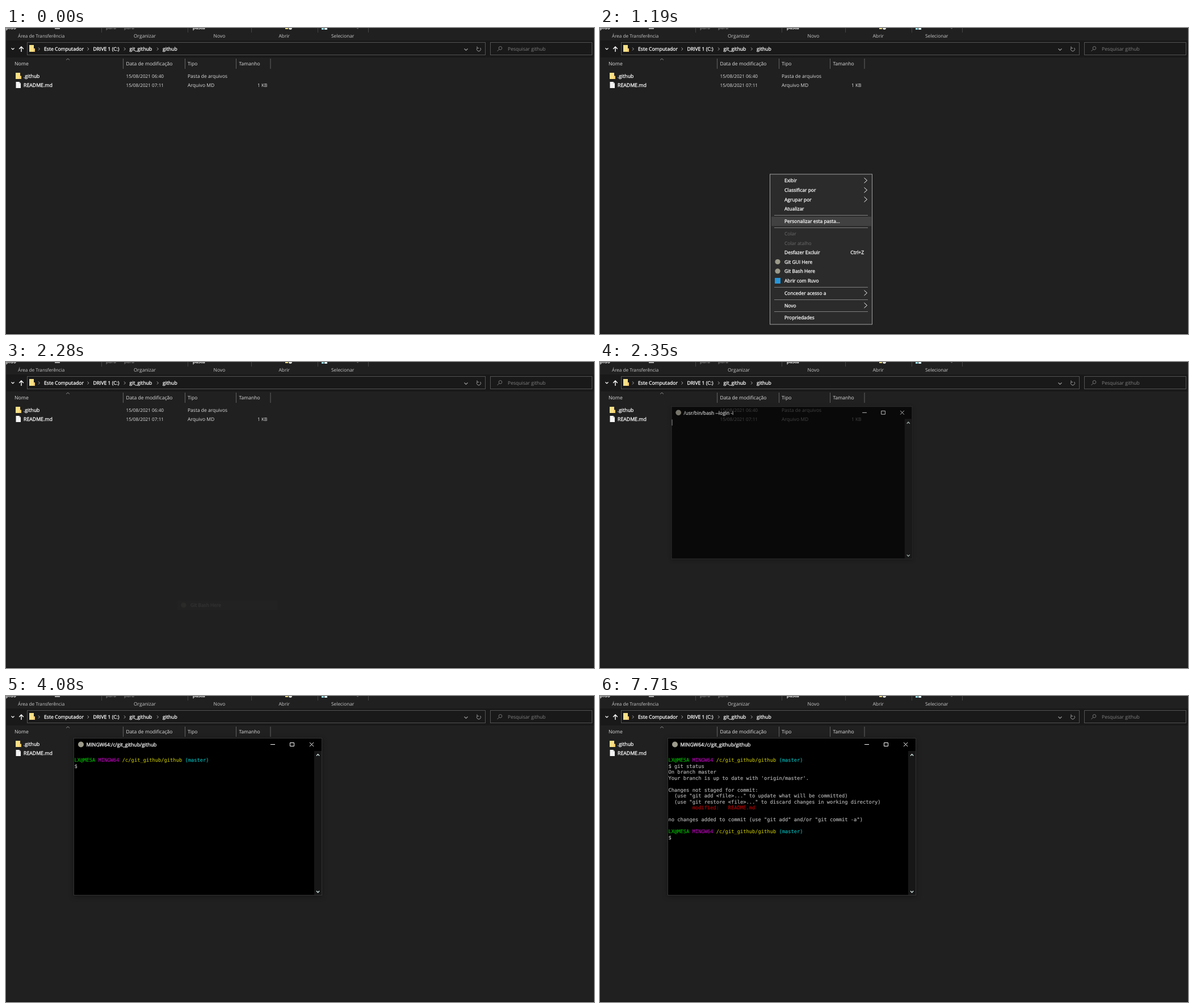
Recreate the animation shown at these times as an HTML page. Size 1036x540 px, loop 8000 ms.

```html
<!DOCTYPE html>
<html lang="pt-BR">
<head>
<meta charset="utf-8">
<title>Git status</title>
<style>
html, body { margin: 0; width: 100%; height: 100%; overflow: hidden; background: #202020; }
svg { display: block; width: 1036px; height: 540px; }
text { font: 8.55px "Open Sans", "Noto Sans", sans-serif; stroke-width: 0; white-space: pre; text-rendering: geometricPrecision; }
.strong { stroke-width: .28px; }
.mono text { font: 8.75px "DejaVu Sans Mono", monospace; stroke-width: .12px; }
.line { fill: none; }
</style>
</head>
<body>
<svg id="stage" viewBox="0 0 1036 540" xmlns="http://www.w3.org/2000/svg"></svg>
<script>
const NS = "http://www.w3.org/2000/svg";
const stage = document.getElementById("stage");

function add(parent, tag, attrs = {}, content) {
  const el = document.createElementNS(NS, tag);
  for (const key in attrs) el.setAttribute(key, attrs[key]);
  if (content !== undefined) el.textContent = content;
  parent.appendChild(el);
  return el;
}
const group = (parent, attrs) => add(parent, "g", attrs);
const rect = (parent, x, y, width, height, fill, more) =>
  add(parent, "rect", { x, y, width, height, fill, ...more });
const line = (parent, d, stroke = "#fff", width = 1) =>
  add(parent, "path", { d, class: "line", stroke, "stroke-width": width });
const ink = color => `fill:${color};stroke:${color}`;
// White text is drawn slightly heavier than grey text
const label = (parent, x, y, str, fill = "#fff", size = 8.55, anchor = "start") =>
  add(parent, "text", {
    x, y, "text-anchor": anchor, class: fill === "#fff" ? "strong" : "",
    style: `${ink(fill)};font-size:${size}px`
  }, str);

// Last entry of a [time, value] table that has begun
function at(table, t) {
  let value = table[0][1];
  for (const [time, v] of table) if (t >= time) value = v;
  return value;
}

/* Explorer */
function folder(x, y, h) {
  rect(stage, x, y, 8, h, "#ffdf86");
  rect(stage, x + 7, y + h / 2, 3, h / 2, "#f3cd6c");
}

function drawExplorer() {
  const grey = "#c8c8c8", soft = "#dedede";
  rect(stage, 0, 22, 1036, 30, "#191919");
  rect(stage, 0, 52, 1, 488, "#191919");
  rect(stage, 0, 538, 1036, 2, "#191919");

  // Ribbon
  for (const x of [168, 320, 432, 549, 638]) rect(stage, x, 0, 1, 8, "#454545");
  label(stage, 0, 2, "pido");
  label(stage, 176, 2, "para", "#999");
  label(stage, 208, 2, "para", "#999");
  label(stage, 329, 2, "pasta");
  rect(stage, 86, 0, 9, 2, "#aaa");
  rect(stage, 492, 0, 5, 2, "#e8d77c");
  add(stage, "circle", { cx: 501, cy: 0, r: 3, fill: "#ddd" });
  rect(stage, 556, 0, 4, 3, "#8fd3ea");
  rect(stage, 561, 0, 5, 3, "#d8f0f8");
  line(stage, "M617 -1l2.5 2 2.5-2", "#888");
  [[21, "Área de Transferência", 8.15], [225, "Organizar", 8.5], [365.5, "Novo"], [480.5, "Abrir", 8.4], [573, "Selecionar", 8.4]]
    .forEach(([x, str, size]) => label(stage, x, 17.3, str, grey, size));

  // Address bar
  rect(stage, 37.5, 25.5, 807, 22, "#191919", { stroke: "#535353" });
  rect(stage, 853.5, 25.5, 179, 22, "#191919", { stroke: "#535353" });
  line(stage, "M9.5 35.5l2.5 2.5 2.5-2.5", "#fff", 1.2);
  line(stage, "M27 42V33M23.2 37L27 33l3.8 4", "#fff", 1.4);
  folder(41, 30, 12);
  for (const x of [57, 143.5, 208, 266]) line(stage, `M${x} 34.5l2.4 2.5-2.4 2.5`, "#aaa");
  label(stage, 67, 40.2, "Este Computador", "#fff", 8.6);
  label(stage, 153.5, 40.2, "DRIVE 1 (C:)", "#fff", 8.6);
  label(stage, 217.5, 40.2, "git_github", "#fff", 8.7);
  label(stage, 276, 40.2, "github", "#fff", 8.6);
  line(stage, "M807.5 36.5l3 3 3-3", "#999", 1.2);
  line(stage, "M835.5 35A3.5 3.5 0 1 1 830.5 35M830 32.5v3h3", "#999");
  add(stage, "circle", { cx: 871, cy: 35.5, r: 2.8, fill: "none", stroke: "#777" });
  line(stage, "M869 37.5l-3.5 3.5", "#777");
  label(stage, 884, 40.2, "Pesquisar github", "#808080");

  // Columns and files
  for (const x of [206, 315, 405, 465.5]) rect(stage, x, 54, 1, 18, "#636363");
  line(stage, "M106 56.5l3-2.5 3 2.5", "#888");
  label(stage, 15, 66.3, "Nome", soft, 8.7);
  label(stage, 211.5, 66.3, "Data de modificação", soft, 8.6);
  label(stage, 320, 66.3, "Tipo", soft);
  label(stage, 410.5, 66.3, "Tamanho", soft);
  folder(17, 79, 11);
  add(stage, "path", { d: "M17.5 95h6l2.5 2.5V106h-8.5z", fill: "#f4f4f4" });
  line(stage, "M23.5 95v2.5H26", "#aaa", 0.7);
  label(stage, 31, 88.2, ".github", "#fff", 8.7);
  label(stage, 31, 104, "README.md", "#fff", 8.75);
  label(stage, 211.5, 88.2, "15/08/2021 06:40", soft, 8.2);
  label(stage, 211.5, 104, "15/08/2021 07:11", soft, 8.2);
  label(stage, 320, 88.2, "Pasta de arquivos", soft, 8.5);
  label(stage, 320, 104, "Arquivo MD", soft, 8.65);
  label(stage, 460.5, 104, "1 KB", soft, 8.4, "end");
}

/* Context menu: y centre, text, kind */
const ITEMS = [
  [269, "Exibir", "sub"], [286, "Classificar por", "sub"], [302.5, "Agrupar por", "sub"], [319, "Atualizar"],
  [341, "Personalizar esta pasta..."], [363, "Colar", "off"], [379.5, "Colar atalho", "off"],
  [396, "Desfazer Excluir"], [412.5, "Git GUI Here", "git"], [429, "Git Bash Here", "git"],
  [446, "Abrir com Ruvo", "app"], [467.5, "Conceder acesso a", "sub"], [489.5, "Novo", "sub"], [511, "Propriedades"]
];
const BASH = 9;

function drawItem(parent, [y, str, kind]) {
  label(parent, 325, y + 3.2, str, kind === "off" ? "#6d6d6d" : "#fff", 8.45);
  if (kind === "sub") line(parent, `M465.5 ${y - 4.5}l5 4.5-5 4.5`);
  if (kind === "git") add(parent, "circle", { cx: 313, cy: y, r: 4.6, fill: "#9c9a8a" });
  if (kind === "app") rect(parent, 308, y - 5, 10, 10, "#2596db");
}
const bar = (parent, y) => rect(parent, 302, y - 8, 176, 16.5, "#414141");

function drawMenu() {
  const g = group(stage);
  rect(g, 299.5, 258, 180, 265, "#2b2b2b", { stroke: "#a0a0a0" });
  const hover = bar(g, 0);
  for (const y of [330, 352, 457, 479, 500]) rect(g, 307, y, 165, 1, "#808080");
  ITEMS.forEach(item => drawItem(g, item));
  label(g, 465, 399.2, "Ctrl+Z", "#fff", 8.5, "end");
  return { g, hover };
}

function drawGhost() {
  const g = group(stage);
  bar(g, ITEMS[BASH][0]);
  drawItem(g, ITEMS[BASH]);
  return g;
}

/* Terminal */
const COL = 5.27, ROW = 10.53, LEFT = 120.5, TOP = 98;

function write(parent, row, parts, col = 0) {
  const el = add(parent, "text", { x: LEFT + col * COL, y: TOP + row * ROW + 7.6, style: ink("#bfbfbf") });
  for (const [str, color] of parts) add(el, "tspan", color ? { style: ink(color) } : {}, str);
  return el;
}
function prompt(parent, row) {
  write(parent, row, [["LX@MESA ", "#00bf00"], ["MINGW64 ", "#bf00bf"], ["/c/git_github/github ", "#bfbf00"], ["(master)", "#00bfbf"]]);
  write(parent, row + 1, [["$"]]);
}

function drawTerminal() {
  const g = group(stage, { style: "filter:drop-shadow(0 2px 4px rgba(0,0,0,.35))" });
  rect(g, 119.5, 74.5, 437, 277, "#000", { stroke: "#333" });
  rect(g, 543, 97, 13, 254, "#171717");
  line(g, "M547 105.5l2.6-2.8 2.6 2.8M547 344l2.6 2.8 2.6-2.8", "#d8e8e8", 1.3);
  add(g, "circle", { cx: 132, cy: 85.5, r: 5, fill: "#9c9a8a" });
  const title = label(g, 141.5, 88.8, "", "#fff", 8.75);
  line(g, "M466 85.5h8M500.5 82.5h7v6h-7zM535 82l7 7M542 82l-7 7");

  const text = group(g, { class: "mono" });
  const first = group(text), output = group(text), second = group(text);
  prompt(first, 1);
  const typed = write(text, 2, [], 2);
  write(output, 3, [["On branch master"]]);
  write(output, 4, [["Your branch is up to date with 'origin/master'."]]);
  write(output, 6, [["Changes not staged for commit:"]]);
  write(output, 7, [['(use "git add <file>..." to update what will be committed)']], 2);
  write(output, 8, [['(use "git restore <file>..." to discard changes in working directory)']], 2);
  write(output, 9, [["modified:   README.md", "#bf0000"]], 8);
  write(output, 11, [['no changes added to commit (use "git add" and/or "git commit -a")']]);
  prompt(second, 13);
  const caret = rect(g, 0, 0, 1, 11, "#bfbfbf");
  return { g, title, first, output, second, typed, caret };
}

/* Timing */
const LOOP = 8000, PROMPT = 3620, ENTER = 6820, OUTPUT = 6890, AGAIN = 7160;
const COMMAND = "git status";
const MENU = [[0, 0], [1000, .4], [1060, .8], [1130, 1], [2010, 0]];
const HOVER = [[0, -1], [1060, 0], [1130, 2], [1190, 4], [1260, 6], [1330, 7], [1400, 8], [1750, BASH]];
const GHOST = [[0, 0], [2010, .9], [2080, .7], [2150, .48], [2210, .26], [2280, .08], [2350, 0]];
const WINDOW = [[0, 0], [2350, .7], [2420, 1]];
const KEYS = [4880, 4950, 5150, 5220, 5450, 5700, 5830, 5960, 6560, 6620];
const BLINK = [[0, 1], [2880, 0], [3360, 1], [4080, 0], [4610, 1], [7710, 0]];

drawExplorer();
const menu = drawMenu(), ghost = drawGhost(), term = drawTerminal();

function fade(el, alpha) {
  el.style.opacity = alpha;
  el.style.display = alpha ? "" : "none";
}

function render(t) {
  fade(menu.g, at(MENU, t));
  const hover = at(HOVER, t);
  fade(menu.hover, hover < 0 ? 0 : 1);
  if (hover >= 0) menu.hover.setAttribute("y", ITEMS[hover][0] - 8);
  fade(ghost, at(GHOST, t));

  const open = at(WINDOW, t), scale = .9 + .1 * open;
  fade(term.g, open);
  term.g.setAttribute("transform", open === 1 ? "" : `translate(338 213) scale(${scale}) translate(-338 -213)`);
  term.title.textContent = t < PROMPT ? "/usr/bin/bash --login -i" : "MINGW64:/c/git_github/github";
  fade(term.first, t >= PROMPT ? 1 : 0);
  fade(term.output, t >= OUTPUT ? 1 : 0);
  fade(term.second, t >= AGAIN ? 1 : 0);

  const count = KEYS.filter(k => t >= k).length;
  term.typed.textContent = COMMAND.slice(0, count);
  const [row, col] = at([[0, [0, 0]], [PROMPT, [2, 2 + count]], [ENTER, [3, 0]], [OUTPUT, [12, 0]], [AGAIN, [14, 2]]], t);
  term.caret.setAttribute("x", Math.round(LEFT - .3 + col * COL));
  term.caret.setAttribute("y", Math.round(TOP + row * ROW - .2));
  fade(term.caret, at(BLINK, t));
}

function tick() {
  render(performance.now() % LOOP);
  requestAnimationFrame(tick);
}
tick();
</script>
</body>
</html>
```
